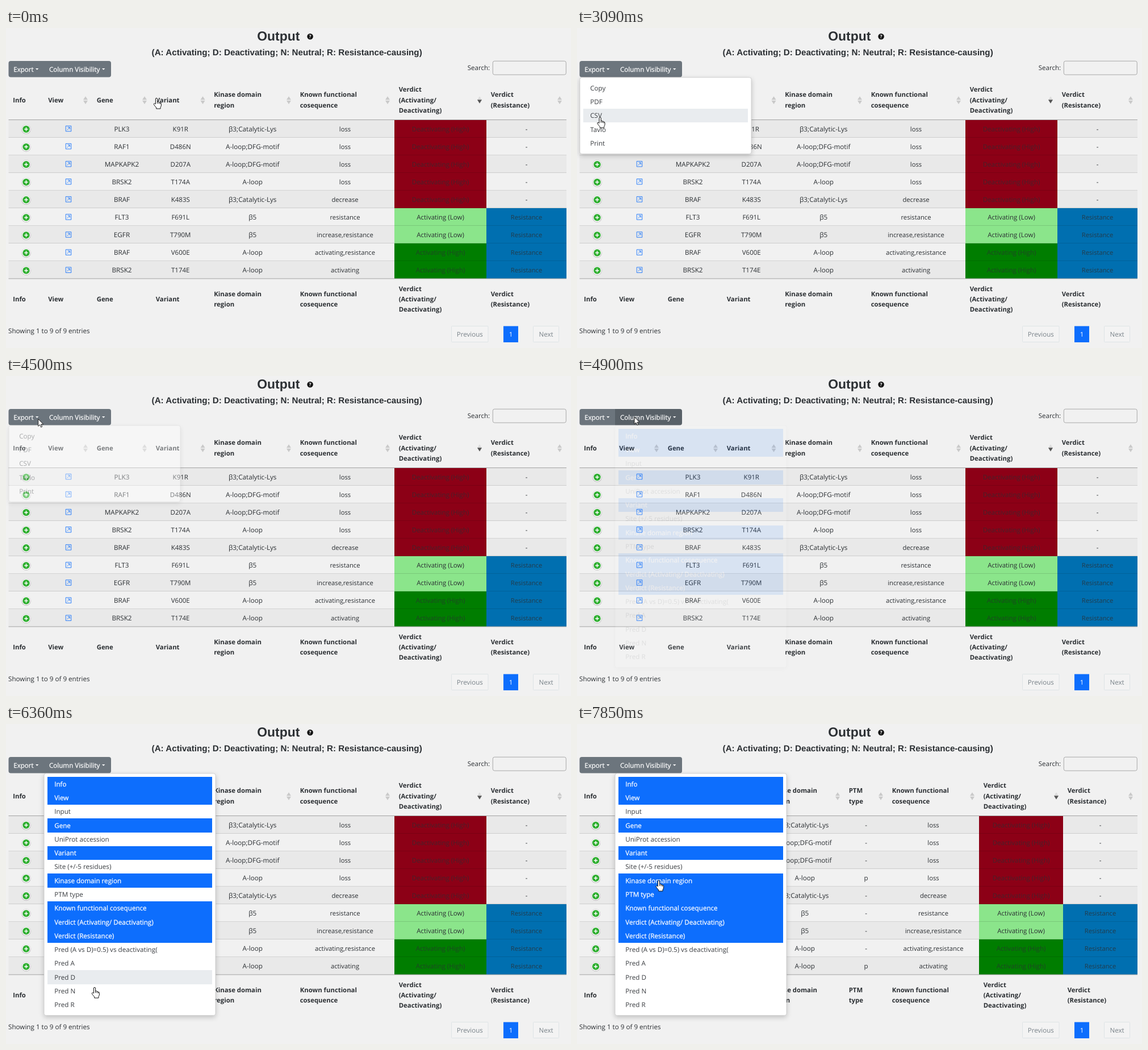
An HTML page that plays this animation: 995 px wide and 563 px high, repeating every 8 s.

```html
<!DOCTYPE html>
<html lang="en">
<head>
<meta charset="utf-8">
<title>Output table</title>
<style>
html, body { margin: 0; width: 100%; height: 100%; overflow: hidden; background: #f1f1f1; }
svg { display: block; width: 995px; height: 563px; text-rendering: geometricPrecision;
  font: 11.5px "Open Sans", "Noto Sans", sans-serif; fill: #2b2f33; }
.title { font-family: "Liberation Sans", Arial, sans-serif; font-weight: bold; }
.head { font-weight: bold; font-size: 11.35px; }
.mid { text-anchor: middle; }
.item { font-size: 11.65px; fill: #3a3d41; }
.on { fill: #fff; stroke: #fff; stroke-width: .25px; }
.menu { filter: drop-shadow(0 3px 4px rgba(0, 0, 0, .2)); }
</style>
</head>
<body>
<svg id="stage" viewBox="0 0 995 563"></svg>
<script>
const LOOP = 8000, STEP = 135.4, LEAD = 32;
const LEFT = 4.5, RIGHT = 987, TOP = 162, ROW = 31, MENU_TOP = 93.4, ITEM = 24.28;
const BLUE = '#0d6efd', GREY = '#6c757d', GREY_HOVER = '#596168';

const rect = (x, y, w, h, fill, more = '') =>
  `<rect x="${x}" y="${y}" width="${w}" height="${h}" fill="${fill}" ${more}/>`;
const path = (d, more = '') => `<path d="${d}" ${more}/>`;
const text = (x, y, s, more = '') => `<text x="${x}" y="${y}" ${more}>${s}</text>`;
const mid = (x, y, s, size = 11.5, more = '') =>
  text(x, y, s, `class="mid" style="font-size:${size}px" ${more}`);
const line = (y, colour) => rect(LEFT, y, RIGHT - LEFT, 1, colour);

const rows = [
  ['PLK3', 'K91R', 'β3;Catalytic-Lys', 'loss'],
  ['RAF1', 'D486N', 'A-loop;DFG-motif', 'loss'],
  ['MAPKAPK2', 'D207A', 'A-loop;DFG-motif', 'loss'],
  ['BRSK2', 'T174A', 'A-loop', 'loss'],
  ['BRAF', 'K483S', 'β3;Catalytic-Lys', 'decrease'],
  ['FLT3', 'F691L', 'β5', 'resistance'],
  ['EGFR', 'T790M', 'β5', 'increase,resistance'],
  ['BRAF', 'V600E', 'A-loop', 'activating,resistance'],
  ['BRSK2', 'T174E', 'A-loop', 'activating']
];
const rowY = i => TOP + i * ROW + (i > 4 ? 0 : 0);
const isLow = i => i === 5 || i === 6;

const plusIcon = (x, y) =>
  `<circle cx="${x}" cy="${y + .4}" r="8.2" fill="#bbb"/><circle cx="${x}" cy="${y}" r="7.5" fill="#fff"/>
   <circle cx="${x}" cy="${y}" r="6.2" fill="#2fae30"/>` +
  path(`M${x - 3.2} ${y}h6.4M${x} ${y - 3.2}v6.4`, 'stroke="#fff" stroke-width="1.5"');
const viewIcon = (x, y) =>
  path(`M${x - 4.5} ${y - 4.5}h9.5v9.5h-9.5zM${x - 2.2} ${y + 2.7}l4.6-4.6M${x - 1.2} ${y - 2.2}h3.8v3.8`,
    `fill="none" stroke="${BLUE}" stroke-width=".85"`);

function verdictCell(i, x, y) {
  const s = i < 5 ? 'Deactivating (High)' : isLow(i) ? 'Activating (Low)' : 'Activating (High)';
  return mid(x, y, s, 11.5, isLow(i) ? '' : 'fill-opacity=".7"');
}
const resistanceCell = (i, x, y) =>
  i < 5 ? mid(x, y, '-') : mid(x, y, 'Resistance', 11.2, 'fill-opacity=".8"');
const field = (k, size) => (i, x, y) => mid(x, y, rows[i][k], size);

const columns = [
  { title: ['Info'], cell: (i, x, y) => plusIcon(x, y - 3.5) },
  { title: ['View'], sort: 1, cell: (i, x, y) => viewIcon(x + .5, y - 4.7) },
  { title: ['Gene'], sort: 1, cell: field(0, 11.7) },
  { title: ['Variant'], sort: 1, cell: field(1, 11.5) },
  { title: ['Kinase domain', 'region'], sort: 1, cell: field(2, 11.7) },
  { title: ['PTM', 'type'], sort: 1, cell: (i, x, y) => mid(x, y, rows[i][0] === 'BRSK2' ? 'p' : '-') },
  { title: ['Known functional', 'cosequence'], sort: 1, cell: field(3, 11.25) },
  { title: ['Verdict', '(Activating/', 'Deactivating)'], sort: 2, cell: verdictCell },
  { title: ['Verdict', '(Resistance)'], sort: 1, cell: resistanceCell }
];

const heading = (lines, x, centre) => lines.map((s, i) =>
  text(x, centre + 4.2 + (i - (lines.length - 1) / 2) * 18.3, s, 'class="head"')).join('');

function sortMark(kind, x) {
  const down = kind === 2;
  return path(`M${x - 4} 126.2l4-6l4 6z`, `fill="${down ? '#dcdcdc' : '#c9c9c9'}"`) +
    path(`M${x - 4} ${down ? 126.3 : 127.7}h8l-4 6.4z`, `fill="${down ? '#555' : '#c9c9c9'}"`);
}

// A zero width hides the column
function table(widths) {
  const a = RIGHT - widths[7] - widths[8], b = RIGHT - widths[8];
  const y = i => Math.round(TOP + i * 31.05);
  const block = (x, end, from, to, fill) => rect(x, y(from), end - x, y(to) - y(from), fill);
  let s = '', x = LEFT;
  for (let i = 0; i < rows.length; i += 2) s += block(LEFT, RIGHT, i, i + 1, '#e9e9e9');
  s += block(a, b, 0, 5, '#8c0016') + block(a, b, 5, 7, '#8be58b') +
    block(a, b, 7, 9, '#007d00') + block(b, RIGHT, 5, 9, '#006fb0');
  for (let i = 1; i < rows.length; i++) s += line(y(i) - 1, 'rgba(0,0,0,.12)');
  columns.forEach(({ title, sort, cell }, k) => {
    const w = widths[k];
    if (!w) return;
    s += heading(title, x + 7.7, 126.3) + heading(title, x + 7.7, 476.9);
    if (sort) s += sortMark(sort, x + w - 12);
    rows.forEach((r, i) => { s += cell(i, x + w / 2, TOP + i * 31.08 + 19.5); });
    x += w;
  });
  return s + line(161, '#a3a3a3') + line(440.5, '#a3a3a3');
}

function page() {
  const caret = x => path(`M${x} 71h5.4l-2.7 2.8z`, 'fill="#fff"');
  const box = (x, w, s) => rect(x, 524.5, w, 28, '#f3f3f3', 'stroke="#dee4e6" rx="1"') +
    mid(x + w / 2, 543, s, 11.6, `fill="${GREY}" fill-opacity=".9"`);
  return text(442.3, 21.5, 'Output', 'class="title" style="font-size:22.9px"') +
    '<circle cx="535.6" cy="15" r="5.3" fill="#111"/>' +
    mid(535.6, 18.2, '?', 8.5, 'class="title" fill="#fff" font-weight="bold"') +
    text(256.6, 48, '(A: Activating; D: Deactivating; N: Neutral; R: Resistance-causing)',
      'class="title" style="font-size:15.17px"') +
    path('M67 58H8.5a4 4 0 0 0-4 4v20.5a4 4 0 0 0 4 4H67z', 'id="exportBtn"') +
    path('M67 58H181a4 4 0 0 1 4 4v20.5a4 4 0 0 1-4 4H67z', 'id="columnBtn"') +
    text(13.3, 76.7, 'Export', 'class="on"') + caret(52) +
    text(76, 76.7, 'Column Visibility', 'class="on" style="font-size:11.6px"') + caret(169) +
    text(812.8, 74.4, 'Search:') +
    rect(857.3, 58.2, 129, 24, '#f1f1f1', 'stroke="#a9a9a9" rx="3"') +
    text(4, 537.4, 'Showing 1 to 9 of 9 entries', 'style="font-size:11.65px"') +
    box(784.5, 64.5, 'Previous') + box(928.5, 45, 'Next') +
    rect(876, 524.5, 26, 28.5, BLUE) + mid(889, 543, '1', 11.5, 'fill="#fff"');
}

const exportItems = ['Copy', 'PDF', 'CSV', 'Tavlo', 'Print'];
const columnItems = ['Info', 'View', 'Input', 'Gene', 'UniProt accession', 'Variant', 'Site (+/-5 residues)',
  'Kinase domain region', 'PTM type', 'Known functional cosequence', 'Verdict (Activating/ Deactivating)',
  'Verdict (Resistance)', 'Pred (A vs D)=0.5) vs deactivating(', 'Pred A', 'Pred D', 'Pred N', 'Pred R'];
const titles = columns.map(c => c.title.join(' ').replace('/ ', '/ '));
const isShown = (s, withPtm) => titles.includes(s) && (withPtm || s !== 'PTM type');

function menu(id, x, items) {
  const edge = i => Math.round(MENU_TOP + i * ITEM);
  const cells = items.map((s, i) => rect(x + 6, edge(i), 290, edge(i + 1) - edge(i), '#fff') +
    text(x + 18.2, MENU_TOP + i * ITEM + 16.4, s)).join('');
  return `<g id="${id}"><g class="menu">` +
    rect(x, 87, 302, items.length * ITEM + 13, '#fff', 'rx="3.5" stroke="#c9c9c9" stroke-width=".8"') +
    `</g>${cells}</g>`;
}

const hand = path('M-1.6 9.8V1Q-1.5-.6 0-.6Q1.5-.6 1.6 1V5.6Q3.8 5 4.2 6.6Q6.1 6 6.5 7.6Q8.3 7.2 8.4 9.2V12Q8.3 13.8 7 15.6V18H-.3V16Q-2.2 14.2-4.6 10.6Q-5.2 8.8-3.6 8.7Q-2.6 8.8-1.6 9.8Z') +
  path('M1.6 5.6V9M4.2 6.6V9.3M6.5 7.6V9.8');
const arrow = path('M0 0V12.6L2.9 9.9L4.9 14.4L6.9 13.5L5 9.2H9Z');

const $ = id => document.getElementById(id);
$('stage').innerHTML = page() +
  `<g id="narrow">${table([62, 85.5, 104, 102.5, 151.5, 0, 174, 162, 141])}</g>` +
  `<g id="wide">${table([57, 80, 98, 92, 139.5, 76, 161, 148, 131])}</g>` +
  menu('exportMenu', 5, exportItems) + menu('columnMenu', 67, columnItems) +
  `<g id="cursor" fill="#fff" stroke="#111" stroke-linejoin="round">
   <g id="hand">${hand}</g><g id="arrow" stroke-width=".9">${arrow}</g></g>`;

// Turning points of the pointer: step, x, y
const turns = [
  [0, 265, 124], [1, 201, 104], [3, 154, 89], [4, 122, 75], [8, 122, 75], [10, 116, 113], [11, 85, 124],
  [12, 40, 89], [13, 34, 74], [19, 34, 73], [25, 44, 200], [27, 42, 101], [29, 42, 77], [32, 42, 77],
  [36, 101, 72], [38, 104, 86], [42, 124, 205], [43, 154, 338], [44, 157, 375], [47, 156, 464],
  [49, 157, 284], [50, 157, 252], [52, 157, 290], [53, 156, 286], [56, 152, 290], [58, 144, 276]
];

function pointer(n) {
  const k = turns.findIndex(p => p[0] > n);
  if (k < 0) return turns[turns.length - 1].slice(1);
  const [n0, x0, y0] = turns[k - 1], [n1, x1, y1] = turns[k];
  const f = (n - n0) / (n1 - n0);
  return [x0 + (x1 - x0) * f, y0 + (y1 - y0) * f];
}

// Fades take 400 ms with a cosine swing
const swing = (n, from) => {
  const p = Math.min(1, Math.max(0, (n - from) * STEP / 400));
  return .5 - Math.cos(p * Math.PI) / 2;
};
const within = (n, from, to) => n >= from && n < to;
const show = (id, on) => $(id).setAttribute('display', on ? 'inline' : 'none');

function paintMenu(id, fade, items, hoverY, isOn) {
  const group = $(id), cells = group.querySelectorAll(':scope > rect'), labels = group.querySelectorAll('text');
  const hover = Math.floor((hoverY - MENU_TOP) / ITEM);
  show(id, fade > 0);
  group.setAttribute('opacity', fade);
  items.forEach((s, i) => {
    const on = isOn(s);
    cells[i].setAttribute('fill', on ? BLUE : i === hover ? '#e9ecef' : '#fff');
    labels[i].setAttribute('class', on ? 'item on' : 'item');
  });
}

function draw(t) {
  const n = Math.floor((t + LEAD) / STEP);
  const [x, y] = pointer(n), hoverY = pointer(Math.max(0, n - .3))[1];
  const opened = 16.4, closed = 31.3, columnsOpened = 35.39;
  const paintButton = (id, on) => $(id).setAttribute('fill', on ? GREY_HOVER : GREY);
  paintButton('exportBtn', within(n, 13, 18));
  paintButton('columnBtn', within(n, 9, 10) || within(n, 35, 39));
  show('narrow', n < 57);
  show('wide', n >= 57);
  paintMenu('exportMenu', swing(n, opened) - swing(n, closed), exportItems, hoverY, () => false);
  paintMenu('columnMenu', swing(n, columnsOpened), columnItems, hoverY, s => isShown(s, n >= 55));
  const isArrow = y < MENU_TOP && (y > 86 || n > opened);
  $('cursor').setAttribute('transform', `translate(${x} ${y})`);
  show('hand', !isArrow);
  show('arrow', isArrow);
}

const start = performance.now();
function tick() {
  draw((performance.now() - start) % LOOP);
  requestAnimationFrame(tick);
}
tick();
</script>
</body>
</html>
```
